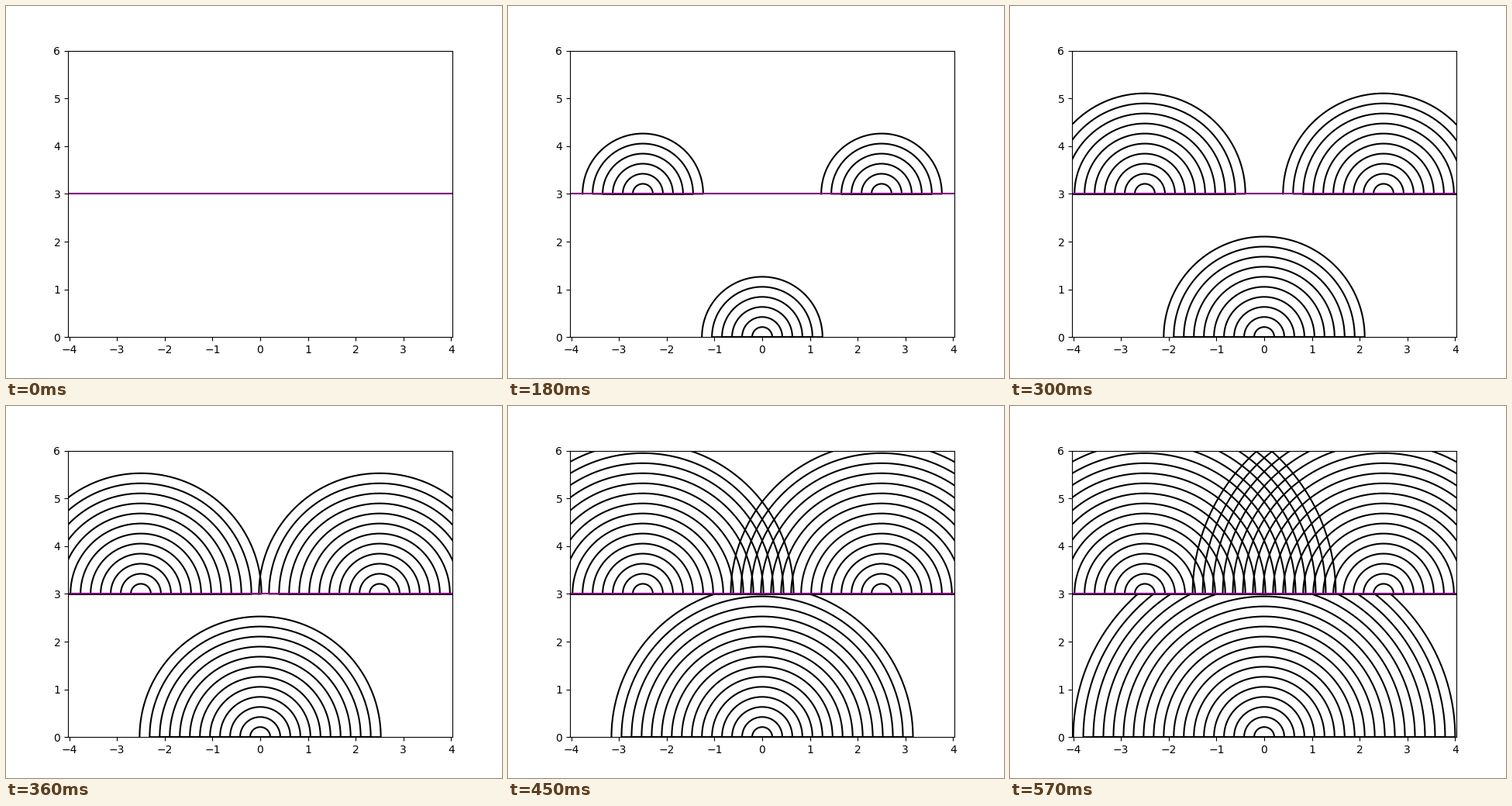
Animation of 640 by 480 pixels, one loop 0.6 s. Source, as a matplotlib script:

```python
import numpy as np
import matplotlib.pyplot as plt
from matplotlib.animation import FuncAnimation

FRAMES = 20
WALL = 3
SOURCES = [(0, 0, WALL), (-2.5, WALL, np.inf), (2.5, WALL, np.inf)]

theta = np.linspace(0, np.pi, 200)
radii = np.linspace(0, 4, FRAMES)

fig, ax = plt.subplots(figsize=(6.4, 4.8), dpi=100)
# equal scale on both axes: 496 x 369.6 px plot area
half_width = 3 * 496 / 369.6
ax.set_xlim(-half_width, half_width)
ax.set_ylim(0, 6)

waves = [ax.plot([], [], color="black", lw=1.5)[0] for _ in SOURCES]
ax.axhline(WALL, color="purple", lw=1.5)


def wavefronts(x0, y0, top, count):
    """Half circles joined end to end along the base line."""
    r = radii[1:count + 1, None]
    x = x0 + r * np.cos(theta)
    y = np.minimum(y0 + r * np.sin(theta), top)
    return x.ravel(), y.ravel()


def update(i):
    for line, (x0, y0, top) in zip(waves, SOURCES):
        line.set_data(*wavefronts(x0, y0, top, i))
    return waves


anim = FuncAnimation(fig, update, frames=FRAMES, interval=30,
                     repeat=True, repeat_delay=0)
plt.show()
```
